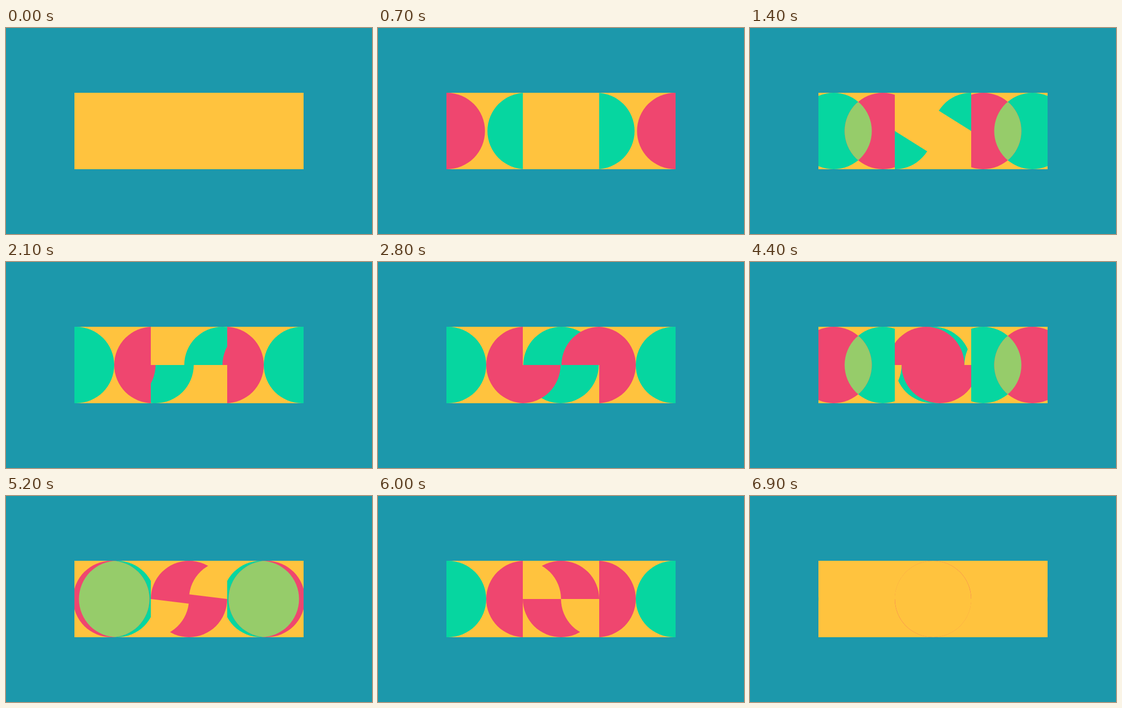
An HTML page with a canvas for the animation above (7 s loop, 690 by 388 pixels).

```html
<!DOCTYPE html>
<html lang="en">
<head>
<meta charset="utf-8">
<title>Geometric tiles</title>
<style>
  html, body { margin: 0; width: 100%; height: 100%; overflow: hidden; background: #1c98ab; }
  canvas { display: block; }
</style>
</head>
<body>
<canvas id="stage" width="690" height="388"></canvas>
<script>
const ctx = document.getElementById('stage').getContext('2d');
const TEAL = '#1c98ab', YELLOW = '#ffc33e', GREEN = '#06d6a0', PINK = '#ef466f', MIX = '#96cc6a';
const R = 72, SIDE = -141, STEP = 1000, TICK = 100, LOOP = 7000;

// cubic-bezier(.3, .2, 0, 1), solved by bisection
function ease(x) {
  const curve = (s, a, b) => 3 * (1 - s) ** 2 * s * a + 3 * (1 - s) * s * s * b + s ** 3;
  let lo = 0, hi = 1;
  for (let i = 0; i < 30; i++) {
    const mid = (lo + hi) / 2;
    if (curve(mid, 0.3, 0) < x) lo = mid; else hi = mid;
  }
  return curve(lo, 0.2, 1);
}

const mix = (a, b, k) => a + (b - a) * k;

// Every part appears twice, turned by half a turn about the centre.
function twice(draw) {
  for (const turn of [0, Math.PI]) {
    ctx.save();
    ctx.rotate(turn);
    draw();
    ctx.restore();
  }
}

function clipBox(x, y, w, h) {
  ctx.beginPath();
  ctx.rect(x, y, w, h);
  ctx.clip();
}

function circle(x) {
  ctx.beginPath();
  ctx.arc(x, 0, R, 0, Math.PI * 2);
}

function disc(color, x = 0) {
  ctx.fillStyle = color;
  circle(x);
  ctx.fill();
}

function half(color, x) {
  twice(() => {
    ctx.fillStyle = color;
    ctx.beginPath();
    ctx.arc(x, 0, R, Math.PI, Math.PI * 2);
    ctx.fill();
  });
}

// Quarter disc around the tile edge; turns counted in right angles.
function quarter(color, turns) {
  const start = Math.PI - turns * Math.PI / 2;
  twice(() => {
    ctx.fillStyle = color;
    ctx.beginPath();
    ctx.moveTo(R, 0);
    ctx.arc(R, 0, R, start, start + Math.PI / 2);
    ctx.fill();
  });
}

function sides(d) {
  twice(() => {
    clipBox(-3 * R, -R, 2 * R, 2 * R);
    disc(GREEN, SIDE + d);
    disc(PINK, SIDE - d);
    circle(SIDE + d);
    ctx.clip();
    disc(MIX, SIDE - d);
  });
}

// from/to: offset of the green side discs; middle: the centre tile
const steps = [
  { from: 147, to: 72, middle() {} },
  { from: 72, to: -72, middle(k) { quarter(GREEN, mix(-2, 0, k)); } },
  { from: -72, to: -72, middle(k) {
    half(GREEN, mix(R, 0, k));
    half(PINK, mix(2 * R, R, k));
  } },
  { from: -72, to: -72, middle(k) {
    disc(GREEN);
    quarter(PINK, k);
    quarter(YELLOW, k - 1);
  } },
  { from: -72, to: 72, middle(k) {
    disc(GREEN);
    half(PINK, mix(-R, 0, k));
    half(YELLOW, mix(R, 2 * R, k));
  } },
  { from: 72, to: -72, middle(k) {
    disc(PINK);
    quarter(YELLOW, mix(-1, 1, k));
  } },
  { from: -72, to: -147, middle(k) {
    disc(PINK);
    half(YELLOW, mix(-R, 0, k));
  } }
];

function render(ms) {
  const t = Math.floor((ms % LOOP) / TICK) * TICK;
  const step = steps[Math.floor(t / STEP)];
  const k = t % STEP ? ease((t % STEP) / STEP) : 0;

  ctx.fillStyle = TEAL;
  ctx.fillRect(0, 0, 690, 388);
  ctx.save();
  ctx.translate(345, 194);
  ctx.fillStyle = YELLOW;
  ctx.fillRect(-3 * R, -R, 6 * R, 2 * R);
  sides(mix(step.from, step.to, k));
  clipBox(-R, -R, 2 * R, 2 * R);
  step.middle(k);
  ctx.restore();
}

const begin = performance.now();
function loop() {
  render(performance.now() - begin);
  requestAnimationFrame(loop);
}
loop();
</script>
</body>
</html>
```
